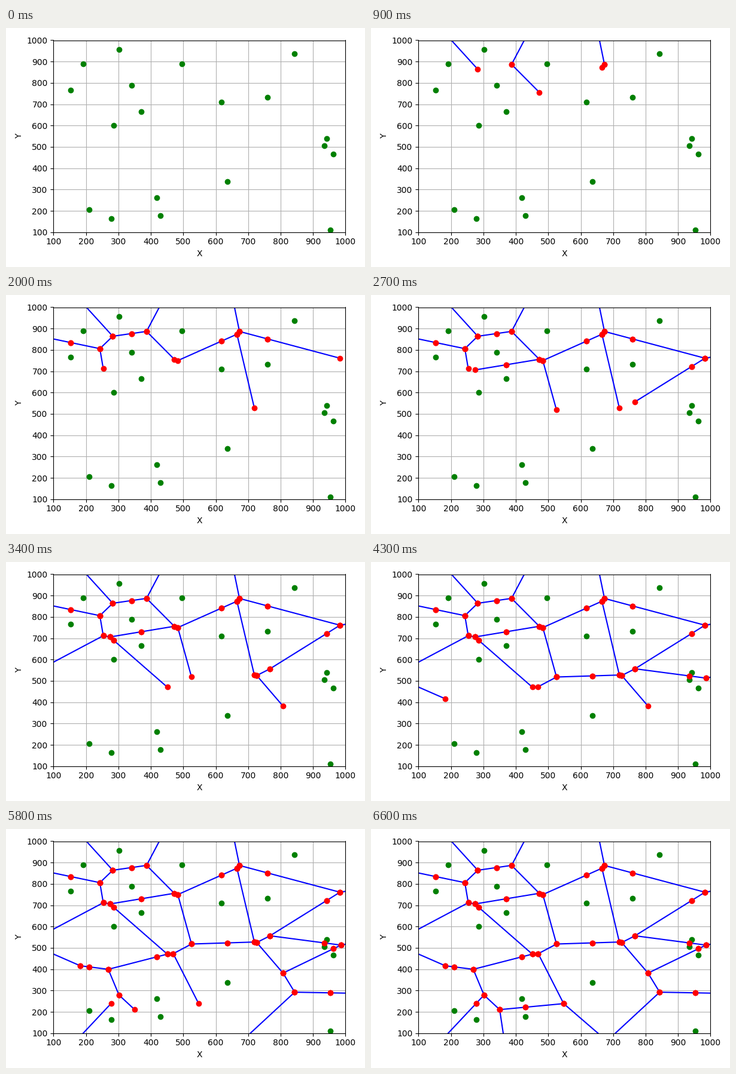
Animation, 600 px wide and 400 px high, one loop 6.7 s. Source, as a matplotlib script:

```python
from itertools import combinations

import matplotlib.pyplot as plt
import numpy as np
from matplotlib.animation import FuncAnimation

FRAMES, INTERVAL = 67, 100
SWEEP_END = -3500   # circle events below this are never reached
FAR = 2e4

SITES = np.array([
    (152, 767), (191, 890), (303, 957), (340, 788), (371, 665),
    (286, 601), (496, 890), (618, 710), (760, 732), (843, 937),
    (942, 540), (935, 505), (963, 467), (636, 336), (418, 263),
    (430, 179), (210, 206), (278, 164), (953, 111), (52, 249),
], float)
OPEN_EDGE = (16, 19)  # stays undrawn


def circumcenter(a, b, c):
    m = 2 * np.array([b - a, c - a])
    return np.linalg.solve(m, [b @ b - a @ a, c @ c - a @ a])


def circle_events():
    """Voronoi vertices by site pair: (sweep height, vertex, third site)."""
    events = {}
    for tri in combinations(range(len(SITES)), 3):
        center = circumcenter(*SITES[list(tri)])
        dist = np.hypot(*(SITES - center).T)
        r = dist[tri[0]]
        if dist.min() < r - 1e-6 or center[1] - r < SWEEP_END:
            continue
        for third in tri:
            pair = tuple(i for i in tri if i != third)
            events.setdefault(pair, []).append((center[1] - r, center, third))
    return events


def site_events():
    """Point where each new site hits the beach line, by site pair."""
    starts = {}
    for i, (x, y) in enumerate(SITES):
        hits = [(((x - px) ** 2 + py ** 2 - y ** 2) / (2 * (py - y)), j)
                for j, (px, py) in enumerate(SITES) if py > y]
        if hits:
            height, j = min(hits)
            starts[tuple(sorted((i, j)))] = np.array([x, height])
    return starts


def edge_ends(pair, events):
    """Both ends of an edge, the one met first by the sweep in front."""
    events = sorted(events, key=lambda e: -e[0])
    ends = [e[1] for e in events]
    if len(ends) == 1:
        a, b = SITES[list(pair)]
        d = np.array([a[1] - b[1], b[0] - a[0]])
        d /= np.hypot(*d)
        if d @ (SITES[events[0][2]] - a) > 0:
            d = -d
        ends.append(ends[0] + FAR * d)
    return ends


def build_segments():
    starts = site_events()
    segs = []
    for pair, events in circle_events().items():
        if pair == OPEN_EDGE:
            continue
        p, q = edge_ends(pair, events)
        if pair in starts:
            segs += [(starts[pair], p), (starts[pair], q)]
        else:
            segs.append((p, q))
    return sorted(segs, key=lambda s: (-s[0][1], s[1][0]))


segments = build_segments()
gap = np.full(2, np.nan)
path = np.array([p for s in segments for p in (*s, gap)])

fig, ax = plt.subplots(figsize=(6, 4), dpi=100)
ax.plot(*SITES.T, "o", color="green")
edges, = ax.plot([], [], "-", color="blue")
nodes, = ax.plot([], [], "o", color="red")
ax.set(xlim=(100, 1000), ylim=(100, 1000), xlabel="X", ylabel="Y")
ticks = range(100, 1001, 100)
ax.set_xticks(ticks)
ax.set_yticks(ticks)
ax.grid(True)
fig.tight_layout()


def draw(i):
    shown = path[:3 * i].T
    edges.set_data(*shown)
    nodes.set_data(*shown)
    return edges, nodes


anim = FuncAnimation(fig, draw, frames=FRAMES, interval=INTERVAL,
                     repeat=True, repeat_delay=0)
plt.show()
```
